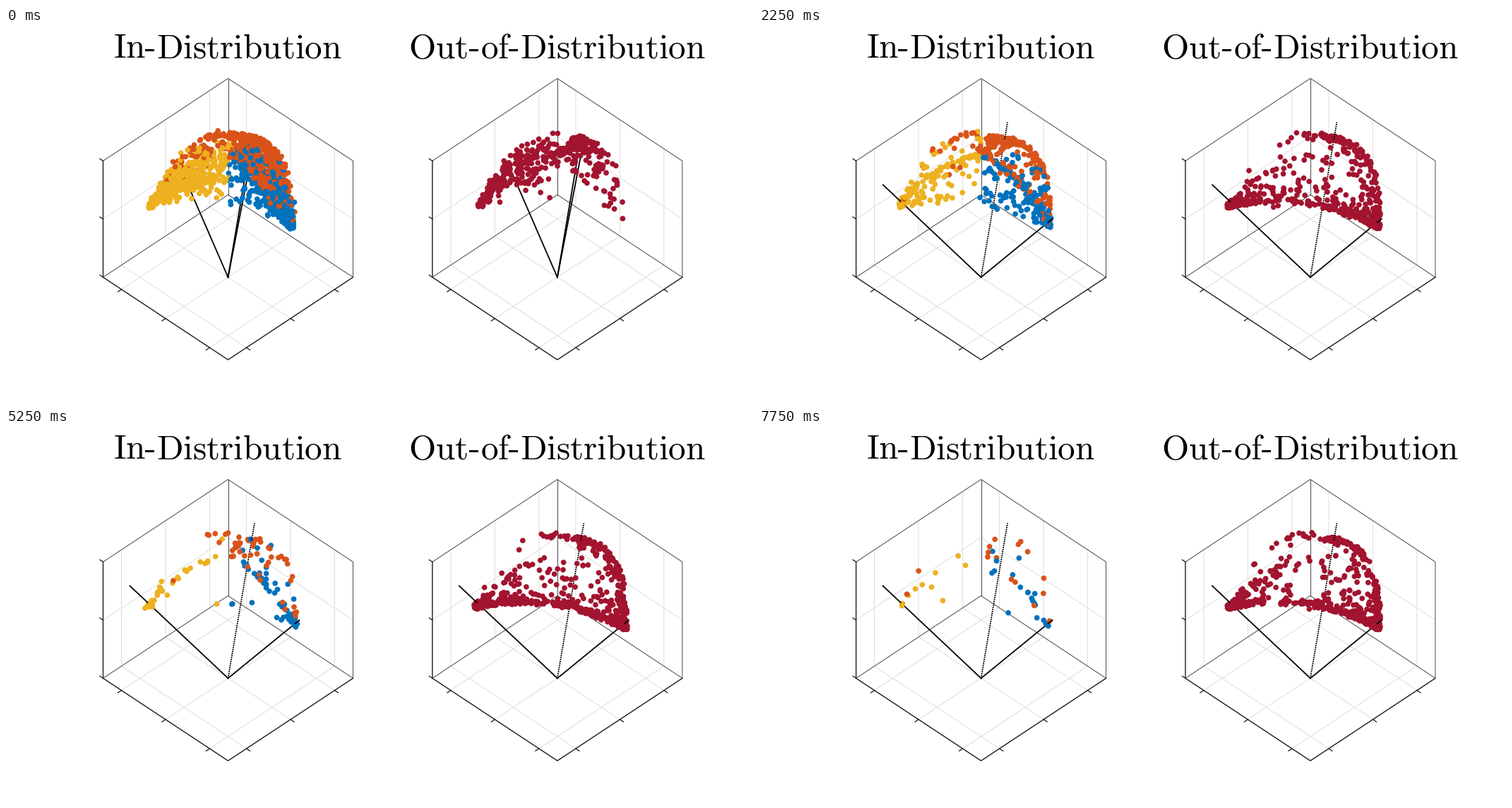
Animation of 1058 by 529 pixels, one loop 8 s. Source, as a matplotlib script:

```python
import numpy as np
import matplotlib.pyplot as plt
from matplotlib.animation import FuncAnimation
from matplotlib.patches import Rectangle

W, H, DPI = 1058, 529, 100
FRAMES, INTERVAL = 32, 250
plt.rcParams["mathtext.fontset"] = "cm"

BLUE, ORANGE, YELLOW, RED = "#0072BD", "#D95319", "#EDB120", "#A2142F"
ORIGIN = np.array([314, 353])
PANELS = (0, 466.4)

# Corners of the curved surface and the points its edges pass halfway.
CORNERS = {"A": (199, 252), "B": (345, 156), "C": (410, 281), "P": (318, 179), "M": (305, 247)}
HALFWAY = {"AP": (250, 203), "CP": (371, 223), "AB": (263, 162), "BC": (397, 190),
           "BP": (326, 164), "AM": (246, 246), "CM": (354, 259)}

# A fan "APM" spreads from corner A between the edges A-P and A-M, favouring the first.
YELLOW_FANS = "APM APM APM APB".split()
ORANGE_FANS = "BCP BCP BCP BPC BAP PCB".split()
BLUE_FANS = "CPM CPM CPB CPB".split()
EARLY_FANS = "APM APB APB BCP BPC".split()
LATE_FANS = "CMB CMB CMB AMP AMP BCA".split()

# Direction lines: first tip, settled tip, and where each leaves the surface.
TIPS = [((-69, -159), (-139, -131), 0.82),
        ((37, -192), (37.5, -220), 0.89),
        ((29, -172), (101, -82.5), 0.94)]

fig = plt.figure(figsize=(W / DPI, H / DPI), dpi=DPI, facecolor="white")
ax = fig.add_axes([0, 0, 1, 1])
ax.set(xlim=(-0.5, W - 0.5), ylim=(H - 0.5, -0.5))
ax.axis("off")


def px(width):
    return width * 72 / DPI


def mix(a, b, t):
    a, b = np.asarray(a, float), np.asarray(b, float)
    return a + (b - a) * t


def path(points, dx, color, width, zorder=1):
    xs, ys = np.array(points, float).T
    return ax.plot(xs + dx, ys, color=color, lw=px(width), zorder=zorder)[0]


def draw_box(dx):
    left, front, right, back = np.array([(137, 353), (314, 470), (491, 353), (314, 236)])
    up = np.array([0, -165])
    grid, edge, ruler = "#DEDEDE", "#4A4A4A", "#1C1C1C"
    for s in (0.147, 0.5, 0.853):
        a, b = mix(left, front, s), mix(front, right, s)
        a2, b2 = a + right - front, b + left - front
        path([a, a2, a2 + up], dx, grid, 1)
        path([b, b2, b2 + up], dx, grid, 1)
        path([a, a + (-5, 3.3)], dx, ruler, 1.3, 2)
        path([b, b + (5, 3.3)], dx, ruler, 1.3, 2)
    path([left + up / 2, back + up / 2, right + up / 2], dx, grid, 1)
    path([left, back, right, right + up, back + up, left + up], dx, edge, 1, 2)
    path([back, back + up], dx, edge, 1, 2)
    path([left + up, left, front, right], dx, ruler, 1.4, 2)
    for s in (0, 0.5, 1):
        tick = left + s * up
        path([tick, tick + (-4.5, -3)], dx, ruler, 1.3, 2)


def draw_title(x, words, em=49.2, baseline=42):
    advance = {"In": 0.917, "Out": 1.723, "of": 0.806, "Distribution": 5.33}
    for i, word in enumerate(words):
        if i:
            ax.add_patch(Rectangle((x + 0.011 * em, baseline - 0.245 * em),
                                   0.265 * em, 0.058 * em, color="black", lw=0))
            x += 0.333 * em
        ax.text(x, baseline, rf"$\mathrm{{{word}}}$", fontsize=px(em),
                ha="left", va="baseline", color="black")
        x += advance[word] * em


def edge_point(a, b, u):
    chord = mix(CORNERS[a], CORNERS[b], 0.5)
    bulge = np.array(HALFWAY["".join(sorted(a + b))]) - chord
    return mix(CORNERS[a], CORNERS[b], u) + 4 * u * (1 - u) * bulge


def fan_dots(rng, fans, count, pull, openness, jitter):
    """Dots gather at each fan's corner by pull and cling to its edges as openness falls."""
    dots = np.empty((count, 2))
    picks = rng.integers(len(fans), size=count)
    for i, (apex, first, second) in enumerate(fans):
        chosen = picks == i
        n = chosen.sum()
        u = rng.random((n, 1)) ** pull
        v = rng.beta(openness, 2 * openness, (n, 1))
        dots[chosen] = mix(edge_point(apex, first, u), edge_point(apex, second, u), v)
    return dots + rng.uniform(-jitter, jitter, dots.shape)


def populations(rng, frame):
    """Per panel: (color, fans, count, pull); the left panel thins out over time."""
    settled = 1 - np.exp(-frame / 1.5)
    left = [(YELLOW, YELLOW_FANS, 480 * np.exp(-frame / 8), 1.4),
            (ORANGE, ORANGE_FANS, 760 * np.exp(-frame / 8), 1.2),
            (BLUE, BLUE_FANS, 520 * np.exp(-frame / 9.5), 1.4)]
    right = [(RED, EARLY_FANS, 420 * np.exp(-frame / 2), 1.3),
             (RED, LATE_FANS, 680 * settled * rng.uniform(0.7, 1.3), 2.4)]
    return left, right


draw_title(151, ["In", "Distribution"])
draw_title(570, ["Out", "of", "Distribution"])
clouds, stems, ends = [], [], []
for offset in PANELS:
    draw_box(offset)
    clouds.append(ax.scatter([], [], s=px(7.7) ** 2, linewidths=0, zorder=4))
    for group, z in ((stems, 3), (ends, 5)):
        group.append([path([ORIGIN, ORIGIN], offset, "black", 1.8, z) for _ in TIPS])


def update(frame):
    rng = np.random.default_rng(100 + frame)
    settled = 1 - np.exp(-frame / 1.5)
    openness = 0.22 + 0.78 * np.exp(-frame / 3)
    jitter = mix(4, 3, settled)
    width = mix(0.95, 1, settled)
    for panel, groups in enumerate(populations(rng, frame)):
        dots, colors = [], []
        for color, fans, count, pull in groups:
            count = round(count)
            dots.append(fan_dots(rng, fans, count, pull, openness, jitter))
            colors += [color] * count
        order = rng.permutation(len(colors))
        dots = np.vstack(dots)[order]
        dots[:, 0] = mix(ORIGIN[0], dots[:, 0], width) + PANELS[panel]
        clouds[panel].set_offsets(dots)
        clouds[panel].set_facecolors(np.array(colors)[order])

        start = ORIGIN + (PANELS[panel], 0)
        for i, (first, last, leave) in enumerate(TIPS):
            tip = mix(first, last, settled)
            surface = start + mix(1, leave, settled) * tip
            stem, end = stems[panel][i], ends[panel][i]
            stem.set_data(*zip(start, surface))
            end.set_data(*zip(surface, start + tip))
            if i == 1:
                for line in (stem, end):
                    line.set_linestyle((0, (1, 0.6)) if frame > 1 else "-")
    return []


anim = FuncAnimation(fig, update, frames=FRAMES, interval=INTERVAL,
                     repeat=True, repeat_delay=0, blit=False)
plt.show()
```
